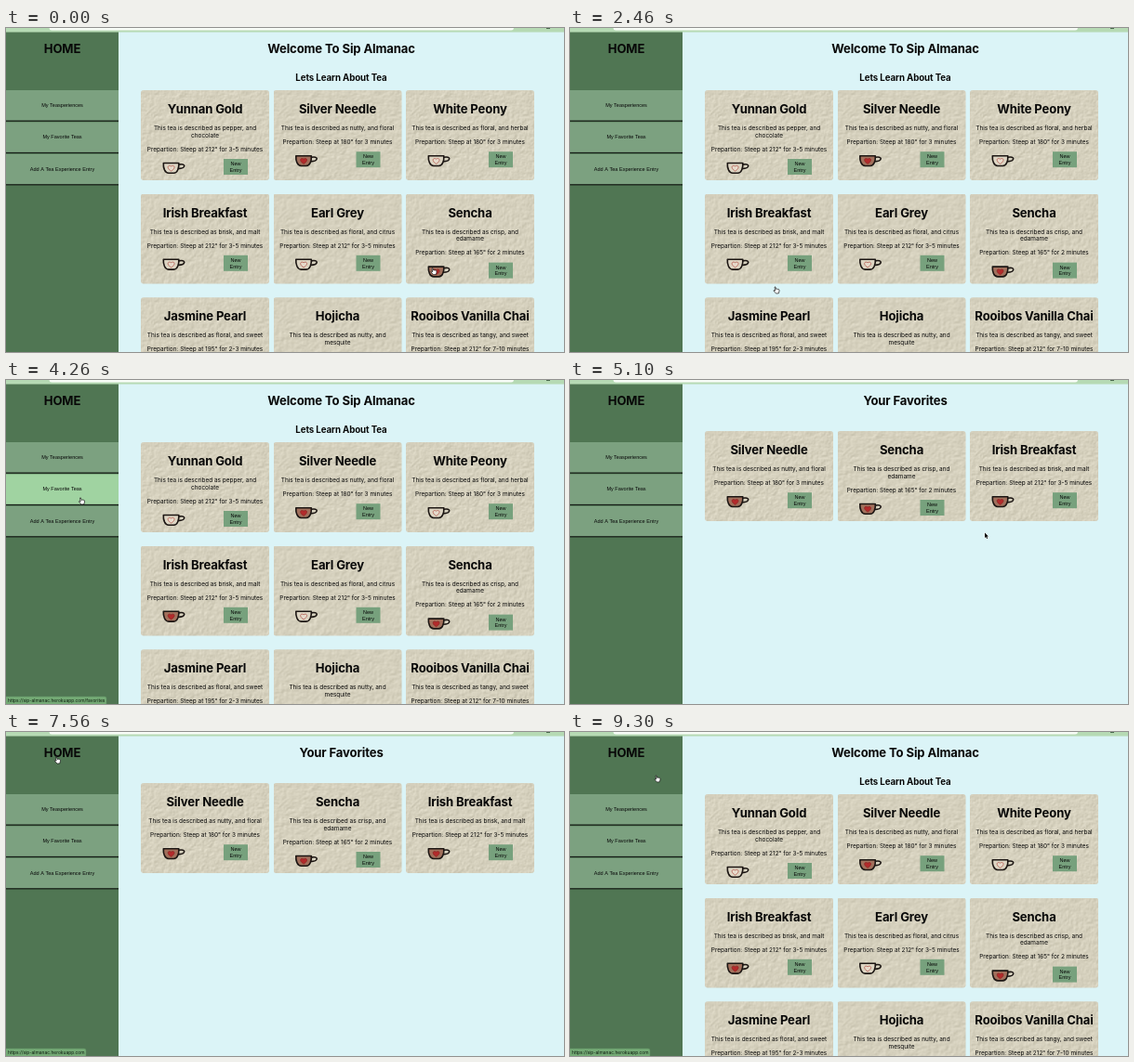
Animation, 600 px wide and 349 px high, one loop 9.36 s. Source, as an HTML page with a canvas:

```html
<!DOCTYPE html>
<html lang="en">
<head>
<meta charset="utf-8">
<title>Sip Almanac</title>
<style>
html, body { margin: 0; width: 100%; height: 100%; overflow: hidden; background: #dbf4f7; }
canvas { display: block; width: 600px; height: 349px; }
</style>
</head>
<body>
<canvas id="stage"></canvas>
<script>
const W = 600, H = 349, LOOP = 9360;
const canvas = document.getElementById('stage');
const dpr = window.devicePixelRatio || 1;
canvas.width = W * dpr;
canvas.height = H * dpr;
const ctx = canvas.getContext('2d');

const SANS = 'Inter, Roboto, sans-serif';
const ARIAL = '"Liberation Sans", Arial, sans-serif';
const STYLES = {
  title: ['bold 13.1px ' + SANS, 13.1, '-0.13px'],
  sub: ['bold 9.7px ' + SANS, 9.7, '-0.09px'],
  body: ['6.45px ' + SANS, 6.45, '0px'],
  button: ['5.55px ' + ARIAL, 5.55, '0px'],
  status: ['4.9px ' + SANS, 4.9, '0px']
};

const TEAS = {
  yunnan: ['Yunnan Gold', 'pepper, and', 'chocolate', '212° for 3-5'],
  silver: ['Silver Needle', 'nutty, and floral', '', '180° for 3'],
  peony: ['White Peony', 'floral, and herbal', '', '180° for 3'],
  irish: ['Irish Breakfast', 'brisk, and malt', '', '212° for 3-5'],
  earl: ['Earl Grey', 'floral, and citrus', '', '212° for 3-5'],
  sencha: ['Sencha', 'crisp, and', 'edamame', '165° for 2'],
  jasmine: ['Jasmine Pearl', 'floral, and sweet', '', '195° for 2-3'],
  hojicha: ['Hojicha', 'nutty, and', 'mesquite', '185° for 1-2'],
  rooibos: ['Rooibos Vanilla Chai', 'tangy, and sweet', '', '212° for 7-10']
};
const SHELF = Object.keys(TEAS);
const FAVORITES = ['silver', 'sencha', 'irish'];
const NAV = ['My Teasperiences', 'My Favorite Teas', 'Add A Tea Experience Entry'];
const SITE = 'https://sip-almanac.herokuapp.com';

// Pointer tip: time, x, y
const PATH = [
  [0, 458.5, 258.5], [500, 459, 258.5], [1100, 462, 264], [1900, 400, 300],
  [2460, 220.5, 278.8], [2880, 180, 252], [3400, 179, 252], [3720, 115, 170],
  [4020, 82, 128], [4260, 80, 126.8], [4620, 81, 126.8], [5100, 446, 164.5],
  [5700, 430, 172], [6300, 170, 110], [6720, 60.5, 66], [7260, 54, 27],
  [8580, 53.5, 26], [8880, 56, 27], [9300, 92.5, 46.8], [LOOP, 94, 47]
];
const LIKE_AT = 3180, OPEN_AT = 4560, HOME_AT = 8820;

function pointer(t) {
  let i = 1;
  while (i < PATH.length - 1 && t > PATH[i][0]) i++;
  const [t0, x0, y0] = PATH[i - 1], [t1, x1, y1] = PATH[i];
  const u = Math.min(1, (t - t0) / (t1 - t0)), e = u * u * (3 - 2 * u);
  return [x0 + (x1 - x0) * e, y0 + (y1 - y0) * e];
}

function hash(x, y) {
  let n = Math.imul(x + 17, 374761393) + Math.imul(y + 5, 668265263);
  n = Math.imul(n ^ (n >>> 13), 1274126177);
  return ((n ^ (n >>> 16)) >>> 0) / 4294967296;
}

function noise(x, y) {
  const ix = Math.floor(x), iy = Math.floor(y);
  const s = v => v * v * (3 - 2 * v);
  const u = s(x - ix), v = s(y - iy);
  const a = hash(ix, iy), b = hash(ix + 1, iy);
  const c = hash(ix, iy + 1), d = hash(ix + 1, iy + 1);
  return a + (b - a) * u + (c - a + (a - b - c + d) * u) * v;
}

function makePaper(w, h) {
  const sheet = document.createElement('canvas');
  sheet.width = w;
  sheet.height = h;
  const g = sheet.getContext('2d'), img = g.createImageData(w, h);
  const height = (x, y) => noise(x / 5.2, y / 4.6) + noise(x / 2.7 + 40, y / 2.5) * 0.9 + noise(x / 1.5, y / 1.5 + 60) * 0.4;
  for (let y = 0; y < h; y++) {
    for (let x = 0; x < w; x++) {
      const slope = height(x + 0.6, y + 0.6) - height(x - 0.6, y - 0.6);
      const light = Math.max(-32, Math.min(18, slope * 19));
      img.data.set([213 + light, 208 + light, 189 + light * 1.05, 255], (y * w + x) * 4);
    }
  }
  g.putImageData(img, 0, 0);
  return sheet;
}
const paper = makePaper(138, 97);

function rect(x, y, w, h, color) {
  ctx.fillStyle = color;
  ctx.fillRect(x, y, w, h);
}

function roundRect(x, y, w, h, r) {
  ctx.beginPath();
  ctx.roundRect(x, y, w, h, r);
}

// y is the middle of the capitals
function text(str, x, y, style, color = '#080808', align = 'center') {
  const [font, size, spacing] = STYLES[style];
  ctx.font = font;
  ctx.letterSpacing = spacing;
  ctx.textAlign = align;
  ctx.fillStyle = color;
  ctx.fillText(str, x, y + size * 0.36);
}

function drawCup(x, y, liked) {
  ctx.save();
  ctx.translate(x, y);
  ctx.lineJoin = 'round';
  ctx.strokeStyle = '#1c1613';
  ctx.lineWidth = 1.6;
  ctx.beginPath();
  ctx.moveTo(17.3, 3.6);
  ctx.bezierCurveTo(25.2, 1.8, 25.8, 7.8, 16.2, 8.2);
  ctx.stroke();
  ctx.beginPath();
  ctx.moveTo(0.9, 2);
  ctx.lineTo(17.4, 2);
  ctx.bezierCurveTo(17.8, 7.5, 15.8, 12.8, 12, 12.8);
  ctx.lineTo(6.5, 12.8);
  ctx.bezierCurveTo(2.5, 12.8, 0.5, 7.5, 0.9, 2);
  ctx.closePath();
  ctx.fillStyle = liked ? '#a1705c' : '#ddd5c3';
  ctx.fill();
  ctx.stroke();
  ctx.beginPath();
  ctx.moveTo(9.2, 10.6);
  ctx.bezierCurveTo(3.7, 7.4, 5.6, 3.4, 9.2, 5.4);
  ctx.bezierCurveTo(12.8, 3.4, 14.7, 7.4, 9.2, 10.6);
  ctx.closePath();
  ctx.fillStyle = liked ? '#b32a2b' : '#e6dacb';
  ctx.fill();
  ctx.lineWidth = 0.8;
  ctx.strokeStyle = liked ? '#8d2624' : '#b2594d';
  ctx.stroke();
  ctx.restore();
}

function drawCard(key, col, y, liked) {
  const [name, taste, more, steep] = TEAS[key];
  const x = 145 + col * 142.5, mid = x + 69, drop = more ? 7.8 : 0;
  ctx.save();
  roundRect(x, y, 138, 97, 3);
  ctx.clip();
  ctx.drawImage(paper, x, y);
  ctx.restore();
  text(name, mid, y + 20.3, 'title');
  text('This tea is described as ' + taste, mid, y + 40.6, 'body');
  if (more) text(more, mid, y + 48.4, 'body');
  text(`Prepartion: Steep at ${steep} minutes`, mid, y + 55.6 + drop, 'body');
  drawCup(x + 23.4, y + 68.7 + drop, liked);
  rect(x + 89, y + 66.2 + drop, 26, 17, '#77a17d');
  text('New', x + 102, y + 71.2 + drop, 'button');
  text('Entry', x + 102, y + 78 + drop, 'button');
}

function drawSidebar(px, py) {
  rect(0, 4, 121, H - 4, '#507653');
  text('HOME', 60.5, 22, 'title');
  NAV.forEach((label, i) => {
    const y = 67 + i * 34.35;
    const over = px < 121 && py >= y && py < y + 33;
    rect(0, y, 121, 33, over ? '#a0d3a1' : '#7ca180');
    rect(0, y + 32.5, 121, 1.25, '#151c16');
    text(label, 60.5, y + 16, 'button');
  });
}

function drawBrowserBar() {
  rect(0, 0, W, 4.5, '#b6dab4');
  ctx.fillStyle = '#f8fcf7';
  roundRect(46.5, -8, 499.5, 10.5, 3);
  ctx.fill();
  rect(581, 0, 4, 0.9, '#405f43');
}

function drawStatus(url, w) {
  ctx.fillStyle = '#74aa75';
  roundRect(-3, 341, w + 3, 12, 2);
  ctx.fill();
  ctx.strokeStyle = '#5f8f61';
  ctx.lineWidth = 0.5;
  ctx.stroke();
  text(url, 2, 345.2, 'status', '#0c1c0e', 'left');
}

function polygon(points) {
  ctx.beginPath();
  points.forEach(([x, y]) => ctx.lineTo(x, y));
  ctx.closePath();
}

function drawArrow(x, y) {
  ctx.save();
  ctx.translate(x, y);
  polygon([[0, 0], [0, 5.6], [1.3, 4.5], [2.2, 6.5], [3.1, 6.1], [2.2, 4.1], [3.9, 4]]);
  ctx.lineWidth = 0.9;
  ctx.strokeStyle = '#fff';
  ctx.stroke();
  ctx.fillStyle = '#000';
  ctx.fill();
  ctx.restore();
}

function drawHand(x, y) {
  ctx.save();
  ctx.translate(x, y);
  ctx.scale(0.92, 0.92);
  polygon([[-0.5, 0.3], [0.3, 0], [1.4, 2.8], [2.5, 2.5], [3.2, 2.7], [4.2, 2.7], [4.9, 3.5],
    [4.8, 5.5], [4.2, 7.6], [1.4, 7.8], [-0.8, 5.9], [-1.7, 4.3], [-1, 4], [0.2, 4.6]]);
  ctx.fillStyle = '#fff';
  ctx.fill();
  ctx.lineWidth = 0.75;
  ctx.lineJoin = 'round';
  ctx.strokeStyle = '#111';
  ctx.stroke();
  ctx.restore();
}

function draw(t) {
  const [px, py] = pointer(t);
  const onFavorites = t >= OPEN_AT && t < HOME_AT;
  ctx.setTransform(dpr, 0, 0, dpr, 0, 0);
  rect(0, 0, W, H, '#dbf4f7');
  drawSidebar(px, py);
  if (onFavorites) {
    text('Your Favorites', 360.5, 22, 'title');
    FAVORITES.forEach((key, i) => drawCard(key, i, 55, true));
  } else {
    text('Welcome To Sip Almanac', 360.5, 22, 'title');
    text('Lets Learn About Tea', 360.5, 53.3, 'sub');
    SHELF.forEach((key, i) => {
      const liked = FAVORITES.includes(key) && (key !== 'irish' || t >= LIKE_AT);
      drawCard(key, i % 3, 67 + Math.floor(i / 3) * 111.6, liked);
    });
  }
  drawBrowserBar();
  if (t >= 3960 && t < 4680) drawStatus(SITE + '/favorites', 108);
  if (t >= 7320) drawStatus(SITE, 86);
  const arrow = t >= 4680 && t < 7140;
  (arrow ? drawArrow : drawHand)(px, py);
}

const start = performance.now();
function tick() {
  draw((performance.now() - start) % LOOP);
  requestAnimationFrame(tick);
}
tick();
</script>
</body>
</html>
```
